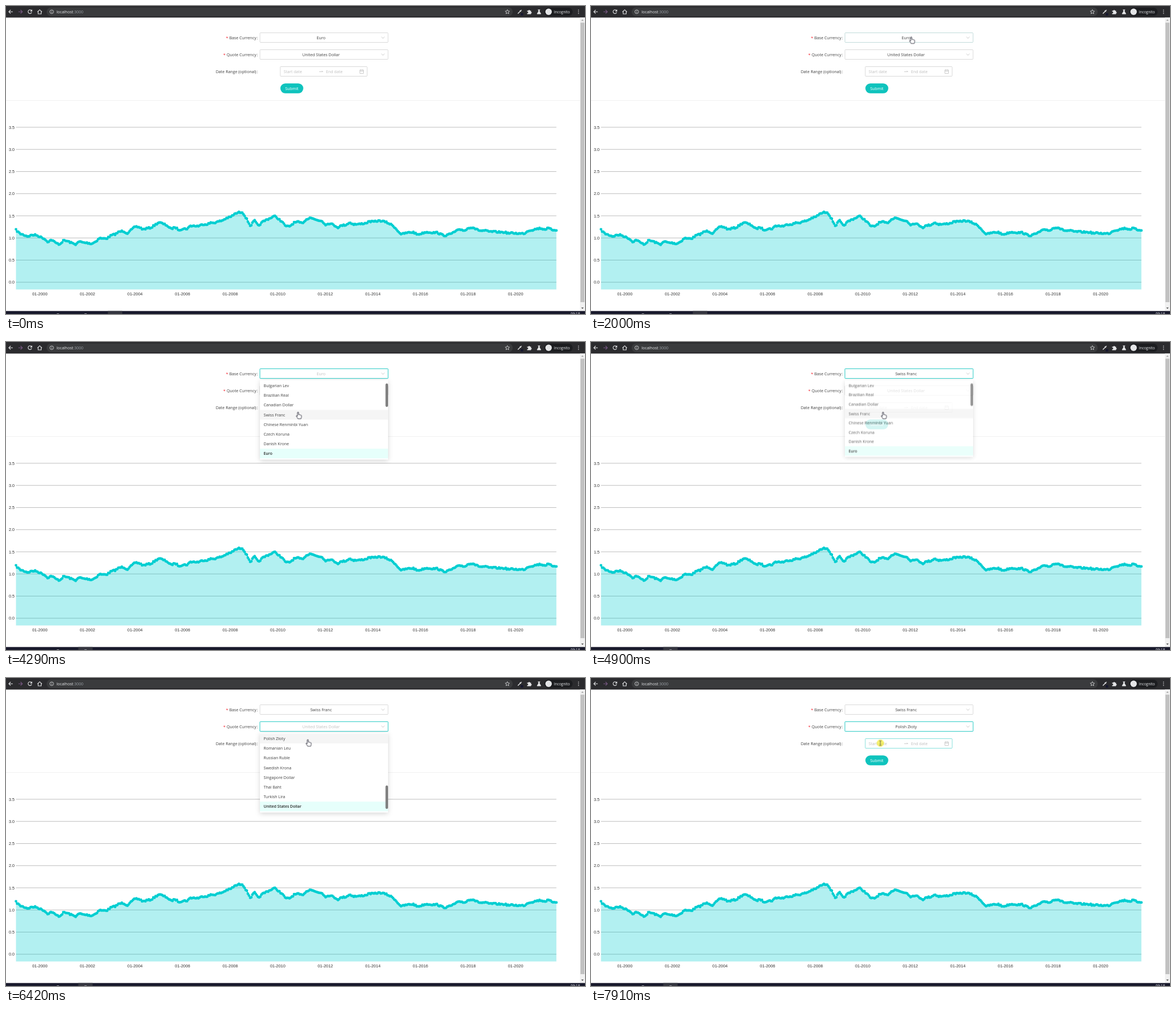
An HTML page that plays this animation: 1026x546 px, repeating every 8 s.

```html
<!DOCTYPE html>
<html lang="en">
<head>
<meta charset="utf-8">
<title>Currency chart</title>
<style>
html, body { margin: 0; width: 100%; height: 100%; overflow: hidden; background: #fff; }
svg { display: block; width: 1026px; height: 546px; }
text { font: 7.15px "Open Sans", "Noto Sans", sans-serif; fill: #404040; white-space: pre; }
.end { text-anchor: end; }
.mid { text-anchor: middle; }
.axis text { font: 7.4px "Liberation Sans", Arial, sans-serif; fill: #333; }
.hint { fill: #bfbfbf; }
.bold { font-size: 6.95px; font-weight: 600; fill: #262626; }
.box { fill: #fff; stroke: #d9d9d9; }
.glow { fill: none; stroke: #13c2c2; stroke-opacity: .22; stroke-width: 2.2; opacity: 0; }
.thin { fill: none; stroke: #bfbfbf; stroke-width: .8; }
.icon { fill: none; stroke: #e4e5e7; stroke-width: 1.1; }
.panel { fill: #fff; filter: drop-shadow(0 2px 4px rgba(0, 0, 0, .17)); }

/* One loop is 8 s, so 1% is 80 ms. */
#baseBox, #baseGlow, #quoteBox, #quoteGlow, #dateBox, #baseList, #quoteList, #cursor {
  animation: 8s linear infinite;
}
#euro, #franc, #dollar, #zloty, #baseHover, #quoteHover, #task, #arrow, #hand, #beam, #press {
  animation: 8s step-end infinite;
}

#baseBox { animation-name: baseBox; }
@keyframes baseBox {
  0%, 24.2% { stroke: #d9d9d9; }
  27%, 29.9% { stroke: #86e0dc; }
  32%, 69.4% { stroke: #40d0cb; }
  71.5%, 100% { stroke: #d9d9d9; }
}
#baseGlow { animation-name: baseGlow; }
@keyframes baseGlow {
  0%, 29.9% { opacity: 0; }
  32%, 69.4% { opacity: 1; }
  71.5%, 100% { opacity: 0; }
}
#quoteBox { animation-name: quoteBox; }
@keyframes quoteBox {
  0%, 65.3% { stroke: #d9d9d9; }
  67.7%, 69.6% { stroke: #86e0dc; }
  71.5%, 100% { stroke: #40d0cb; }
}
#quoteGlow { animation-name: quoteGlow; }
@keyframes quoteGlow {
  0%, 69.6% { opacity: 0; }
  71.5%, 100% { opacity: 1; }
}
#dateBox { animation-name: dateBox; }
@keyframes dateBox {
  0%, 85.5% { stroke: #d9d9d9; }
  88.5%, 100% { stroke: #86e0dc; }
}

#euro { animation-name: euro; }
@keyframes euro {
  0% { fill: #404040; }
  30.5% { fill: #bfbfbf; }
  60.3%, 100% { fill: transparent; }
}
#franc { animation-name: franc; }
@keyframes franc {
  0% { fill: transparent; }
  60.3%, 100% { fill: #404040; }
}
#dollar { animation-name: dollar; }
@keyframes dollar {
  0% { fill: #404040; }
  70.7% { fill: #bfbfbf; }
  83%, 100% { fill: transparent; }
}
#zloty { animation-name: zloty; }
@keyframes zloty {
  0% { fill: transparent; }
  83%, 100% { fill: #404040; }
}

#baseList { animation-name: baseList; transform-origin: 0 67.5px; }
@keyframes baseList {
  0%, 30.6% { opacity: 0; transform: scaleY(.8); animation-timing-function: ease-out; }
  33.2%, 60.3% { opacity: 1; transform: none; animation-timing-function: ease-in; }
  63%, 100% { opacity: 0; transform: scaleY(.8); }
}
#quoteList { animation-name: quoteList; transform-origin: 0 97.5px; }
@keyframes quoteList {
  0%, 70.8% { opacity: 0; transform: scaleY(.8); animation-timing-function: ease-out; }
  73.4%, 83% { opacity: 1; transform: none; animation-timing-function: ease-in; }
  85.7%, 100% { opacity: 0; transform: scaleY(.8); }
}
#baseHover { animation-name: baseHover; }
@keyframes baseHover {
  0% { opacity: 0; transform: none; }
  42.4% { opacity: 1; transform: none; }
  45.2% { opacity: 1; transform: translateY(17.18px); }
  48% { opacity: 1; transform: translateY(34.36px); }
  52%, 100% { opacity: 1; transform: translateY(51.54px); }
}
#quoteHover { animation-name: quoteHover; }
@keyframes quoteHover {
  0% { opacity: 0; }
  77.6%, 100% { opacity: 1; }
}
#task { animation-name: task; }
@keyframes task {
  0% { transform: none; }
  29.9%, 100% { transform: translateX(-52.5px); }
}

#cursor { animation-name: cursor; }
@keyframes cursor {
  0%, 3.8% { transform: translate(972px, 546px); animation-timing-function: ease-in; }
  6.2% { transform: translate(865px, 487px); }
  9% { transform: translate(718px, 407px); }
  11.4% { transform: translate(671px, 318px); }
  13.6% { transform: translate(648px, 245px); }
  18.8% { transform: translate(592px, 112px); animation-timing-function: ease-out; }
  24.2%, 25% { transform: translate(567.5px, 54.3px); }
  26.7%, 39.7% { transform: translate(565px, 52.8px); }
  42.4% { transform: translate(553px, 69px); }
  45.2% { transform: translate(538px, 87px); }
  49.4% { transform: translate(522px, 110px); animation-timing-function: ease-out; }
  53.6%, 61.8% { transform: translate(517.5px, 123.8px); animation-timing-function: ease-in-out; }
  68%, 74.5% { transform: translate(536.5px, 83.8px); animation-timing-function: ease-in-out; }
  80.2%, 85% { transform: translate(534.7px, 108.7px); }
  89%, 91.8% { transform: translate(537px, 114px); animation-timing-function: ease-in-out; }
  97.5%, 100% { transform: translate(512.7px, 115.5px); }
}
#arrow { animation-name: arrow; }
@keyframes arrow {
  0% { opacity: 0; }
  3.9% { opacity: 1; }
  22.6%, 100% { opacity: 0; }
}
#hand { animation-name: hand; }
@keyframes hand {
  0% { opacity: 0; }
  22.6% { opacity: 1; }
  85.7%, 100% { opacity: 0; }
}
#beam { animation-name: beam; }
@keyframes beam {
  0% { opacity: 0; }
  85.7%, 100% { opacity: 1; }
}
#press { animation-name: press; }
@keyframes press {
  0% { opacity: 0; }
  29.9% { opacity: .65; }
  32.4% { opacity: 0; }
  58.7% { opacity: .65; }
  61.2% { opacity: 0; }
  69% { opacity: .65; }
  71.5% { opacity: 0; }
  82.5% { opacity: .65; }
  84.8% { opacity: 0; }
  98%, 100% { opacity: .65; }
}
</style>
</head>
<body>
<svg viewBox="0 0 1026 546">
  <rect width="1026" height="546" fill="#fff"/>

  <!-- browser bar -->
  <rect width="1026" height="20.5" fill="#2b2b2e"/>
  <rect x="72" y="2.5" width="826" height="15.5" rx="7.75" fill="#3a3b3d"/>
  <g class="icon">
    <path d="M12 10.2H5M8.2 7 5 10.2l3.2 3.2"/>
    <path d="M22 10.2h7M25.8 7 29 10.2l-3.2 3.2" stroke="#7a5a86"/>
    <path d="M45.3 8.4A3.3 3.3 0 1 0 45.5 11.3M45.8 6.5v2.6h-2.6"/>
    <path d="M55.8 10.5 59.7 6.7l3.9 3.8M57 9.8v4.2h5.4V9.8"/>
    <circle cx="81" cy="10.2" r="3.3" stroke-width=".8"/>
    <path d="M81 9.8v2.2M81 8.2v.8" stroke-width=".8"/>
    <path d="m888.5 6.4 1.1 2.5 2.7.3-2 1.8.6 2.7-2.4-1.4-2.4 1.4.6-2.7-2-1.8 2.7-.3z" stroke-width=".8"/>
    <path d="m907 13.5 4-4M910.5 8l2 2M911.5 9l2-2" stroke-width="1.4"/>
  </g>
  <rect x="912" y="12.5" width="4.5" height="4.5" fill="#17182e"/>
  <g fill="#e4e5e7">
    <path d="M923.5 8.2h2.2a1.3 1.3 0 1 1 2.6 0h2v2.3a1.3 1.3 0 1 1 0 2.6v1.4h-6.8v-2a1.3 1.3 0 1 0 0-2.4z"/>
    <path d="M942.5 6.2h4v1h-.8v2.3l2.5 4.2q0 .8-.8.8h-5.8q-.8 0-.8-.8l2.5-4.2V7.2h-.8z"/>
    <circle cx="1014.5" cy="7.2" r=".8"/><circle cx="1014.5" cy="10.2" r=".8"/><circle cx="1014.5" cy="13.2" r=".8"/>
  </g>
  <rect x="954" y="3" width="50" height="14.5" rx="7.25" fill="#1c1d20"/>
  <circle cx="961.5" cy="10.2" r="5.7" fill="#e4e5e7"/>
  <text x="971" y="12.6" style="font-size:6.5px;fill:#e8eaed">Incognito</text>
  <text x="89.5" y="12.8" style="font-size:7.06px;fill:#e8eaed">localhost<tspan fill="#9aa0a6">:3000</tspan></text>

  <!-- form -->
  <path d="M0 167.5H1017" stroke="#f0f0f0"/>
  <text class="end" x="446.2" y="58.7"><tspan fill="#f5222d">* </tspan>Base Currency<tspan dx=".8">:</tspan></text>
  <text class="end" x="446.2" y="88.7"><tspan fill="#f5222d">* </tspan>Quote Currency<tspan dx=".8">:</tspan></text>
  <text class="end" x="446.2" y="118.7">Date Range (optional)<tspan dx=".8">:</tspan></text>
  <rect id="baseGlow" class="glow" x="450" y="47.5" width="227" height="17" rx="1"/>
  <rect id="baseBox" class="box" x="450" y="47.5" width="227" height="17" rx="1"/>
  <rect id="quoteGlow" class="glow" x="450" y="77.5" width="227" height="17" rx="1"/>
  <rect id="quoteBox" class="box" x="450" y="77.5" width="227" height="17" rx="1"/>
  <rect id="dateBox" class="box" x="486" y="107.5" width="154" height="17" rx="1"/>
  <g class="mid">
    <text id="euro" x="558.3" y="58.7">Euro</text>
    <text id="franc" x="558.3" y="58.7">Swiss Franc</text>
    <text id="dollar" x="558.3" y="88.7">United States Dollar</text>
    <text id="zloty" x="558.3" y="88.7">Polish Złoty</text>
  </g>
  <text class="hint" x="492" y="118.7">Start date</text>
  <text class="hint" x="567" y="118.7">End date</text>
  <g class="thin">
    <path d="m665.3 54.5 2.7 3 2.7-3M665.3 84.5l2.7 3 2.7-3"/>
    <path d="M555 116.5h6.5l-2-1.8"/>
    <path d="M627 113.5h6.5v6H627zM627 115.5h6.5M628.7 112.3v2M631.8 112.3v2"/>
  </g>
  <rect x="486.2" y="137.2" width="40.6" height="17.6" rx="8.8" fill="#0fc3bd"/>
  <text class="mid" x="506.5" y="148.7" style="fill:#fff">Submit</text>

  <g id="chart" class="axis"></g>

  <!-- page scrollbar and taskbar -->
  <rect x="1017" y="20.5" width="9" height="521" fill="#f1f1f1"/>
  <rect x="1018" y="29.5" width="7" height="495.5" fill="#c1c1c1"/>
  <path d="m1019.3 26.3 2.2-2.6 2.2 2.6z" fill="#a3a3a3"/>
  <path d="m1019.3 534.5 2.2 2.6 2.2-2.6z" fill="#505050"/>
  <rect y="540.7" width="1026" height="5.3" fill="#191a2c"/>
  <rect id="task" x="180.5" y="540.7" width="25.5" height="5.3" fill="#34353f"/>
  <path d="M90 545.5h4M139 545.5h4" stroke="#8d8e98"/>
  <text x="1000.5" y="548.3" style="font-size:6.5px;fill:#e8e8ee">09:18</text>

  <g id="baseList"></g>
  <g id="quoteList"></g>

  <g id="cursor">
    <circle id="press" r="6.5" fill="#f2ea20"/>
    <path id="arrow" d="M0 0v9.5l2.2-2 1.5 3.3 1.4-.6-1.5-3.2h3z" fill="#fff" stroke="#222" stroke-width=".7"/>
    <path id="hand" d="M-1 1q1-1.3 2 0v4q1.4-.8 1.9.3 1.3-.5 1.7.5 1.3-.3 1.4 1v2.4q0 1.5-.8 3H-.3Q-1.5 9.7-2.9 8q-.7-1.3.5-1.3l1.4 1.2z" fill="#fff" stroke="#2a2a38" stroke-width=".9" stroke-linejoin="round"/>
    <path id="beam" d="M-2-4h1.3L0-3.5.7-4H2M0-3.5v7M-2 4h1.3L0 3.5.7 4H2" fill="none" stroke="#444" stroke-width=".8"/>
  </g>
</svg>

<script>
const byId = id => document.getElementById(id);

// Heights of the rate curve, evenly spaced from x = 18 to x = 975.
const curve = [
  397, 403.5, 406, 408.5, 406, 406, 409, 412, 418, 414.5, 420, 422.5, 415.5, 417, 420, 422.5, 417.5,
  419.5, 420, 421.5, 418, 411.5, 412.5, 411.5, 406.5, 404.5, 400, 399, 403, 397, 391, 392, 396, 394,
  393, 388, 383.5, 386, 389, 395.5, 392, 397, 395, 395, 389.5, 390, 390, 387, 387, 384.5, 384, 382,
  380, 376, 374, 369, 366, 365.5, 377, 390, 380, 390, 383, 379, 376, 372, 377, 383, 391, 390, 384,
  383, 385, 379, 374.5, 378, 380, 381, 388, 385, 388.5, 392.5, 389, 388, 384, 387, 387, 386, 385,
  382, 382.5, 381, 381, 383, 386, 390, 398, 405, 402.5, 401.5, 401, 405, 403.5, 401, 401, 402, 401.5,
  405, 407, 405, 402, 398, 396.5, 398, 393, 392.5, 396.5, 398.5, 398, 400, 400, 400.5, 401, 401, 403,
  402.5, 403, 403.5, 403, 398, 397, 395, 394, 396, 394, 397, 397
];

let seed = 7;
const random = () => (seed = seed * 16807 % 2147483647) / 2147483647;

function drawChart() {
  const left = 17.7, right = 975.3, bottom = 502.4, count = 480, last = curve.length - 1;
  const points = Array.from({ length: count + 1 }, (_, i) => {
    const at = i / count * last, k = Math.min(Math.floor(at), last - 1);
    const y = curve[k] + (curve[k + 1] - curve[k]) * (at - k) + (random() - .5) * 2.4;
    return [(left + (right - left) * i / count).toFixed(1), y.toFixed(1)];
  });
  const line = points.map(p => p.join(' ')).join('L');
  const dots = points.map(p => `M${p.join(' ')}h.01`).join('');
  let out = '';
  for (let k = 0; k < 8; k++) {
    const y = 489.7 - 39.25 * k;
    out += `<path d="M${left} ${y}H${right}" stroke="#bdbdbd"/>
      <text class="end" x="15.2" y="${y + 2.6}">${(k / 2).toFixed(1)}</text>`;
  }
  for (let k = 0; k < 11; k++) {
    out += `<text class="mid" x="${60 + 84.3 * k}" y="512.8">01-${2000 + 2 * k}</text>`;
  }
  byId('chart').innerHTML = out +
    `<path d="M${left} ${bottom}L${line}L${right} ${bottom}Z" fill="#00ced1" fill-opacity=".3"/>
     <path d="M${line}" fill="none" stroke="#00ced1" stroke-width="2"/>
     <path d="${dots}" stroke="#00ced1" stroke-width="4.8" stroke-linecap="round"/>`;
}

// The last name is the selected one.
function drawList(id, hoverId, top, thumb, names) {
  const step = 17.18, first = top + 1.4, end = names.length - 1;
  const row = (i, fill, extra = '') =>
    `<rect ${extra} x="450" y="${first + step * i}" width="227" height="${step}" fill="${fill}"/>`;
  byId(id).innerHTML =
    `<rect class="panel" x="450" y="${top}" width="227" height="141" rx="1"/>` +
    row(end, '#e6fffb') + row(0, '#f5f5f5', `id="${hoverId}"`) +
    names.map((name, i) =>
      `<text class="${i === end ? 'bold' : ''}" x="456.5" y="${top + 12.6 + step * i}">${name}</text>`).join('') +
    `<rect x="672.5" y="${thumb}" width="4.5" height="41.5" rx="2.2" fill="#7f7f7f"/>`;
}

drawChart();
drawList('baseList', 'baseHover', 67.5, 73.5, ['Bulgarian Lev', 'Brazilian Real', 'Canadian Dollar',
  'Swiss Franc', 'Chinese Renminbi Yuan', 'Czech Koruna', 'Danish Krone', 'Euro']);
drawList('quoteList', 'quoteHover', 97.5, 190.5, ['Polish Złoty', 'Romanian Leu', 'Russian Ruble',
  'Swedish Krona', 'Singapore Dollar', 'Thai Baht', 'Turkish Lira', 'United States Dollar']);
</script>
</body>
</html>
```
